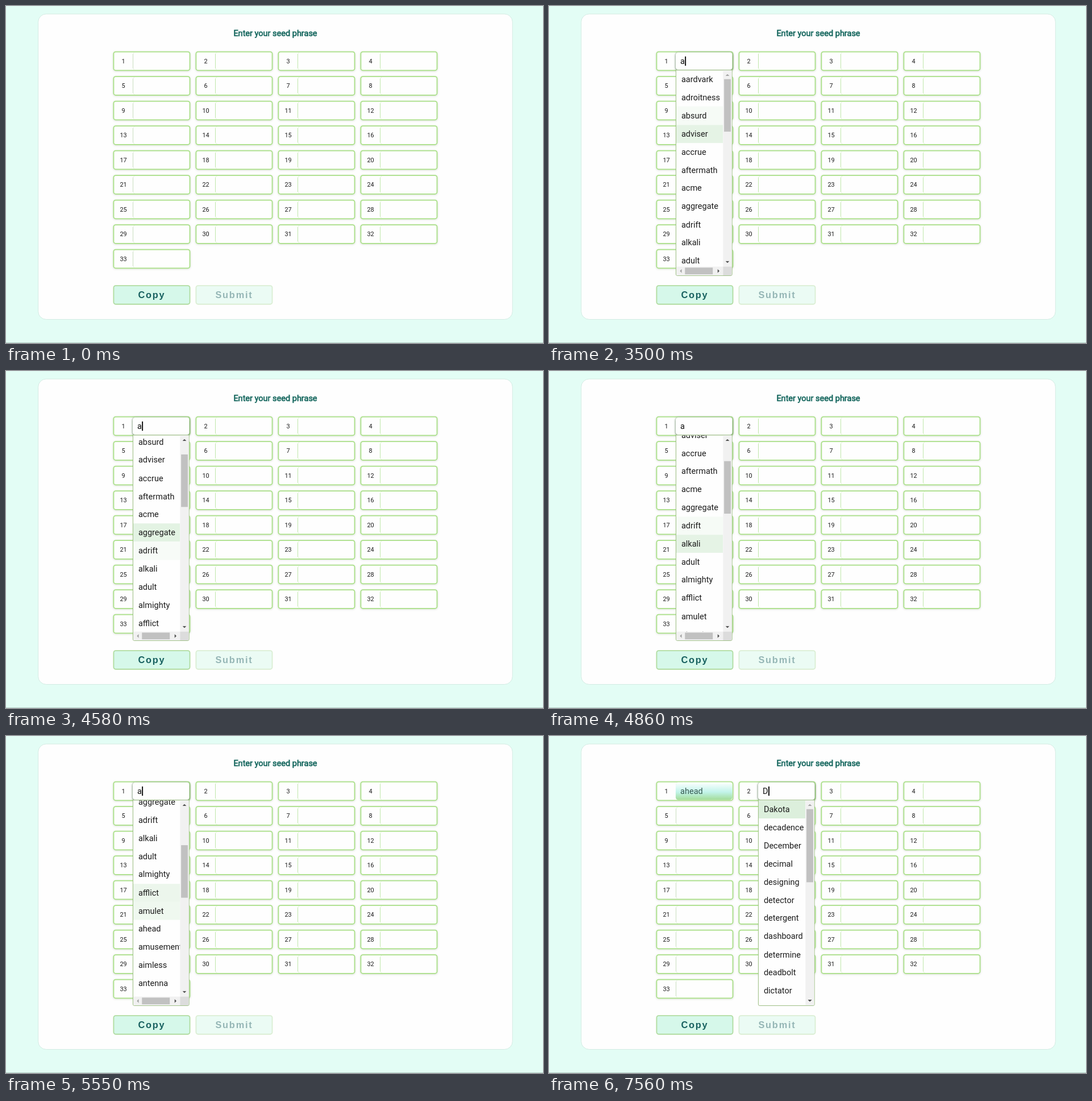
These frames come from a looping animation (945x593 px, 8000 ms). An HTML page:

```html
<!DOCTYPE html>
<html lang="en">
<head>
<meta charset="utf-8">
<title>Seed phrase form</title>
<style>
* { box-sizing: border-box; }
html, body { margin: 0; width: 100%; height: 100%; overflow: hidden; }
body { background: #e3fdf5; font: 16px Roboto, sans-serif; color: #1c1c1c; }
div { position: absolute; white-space: nowrap; }
.floor { left: 0; top: 592px; width: 945px; height: 1px; background: #b4d0c6; }
/* The page is laid out in whole pixels and shown slightly reduced. */
#stage { left: 0; top: 0; width: 1042px; height: 653px; transform: scale(.90625); transform-origin: 0 0; }
.card { left: 62px; top: 15px; width: 922px; height: 594px; border: 1px solid #d0e9e0; border-radius: 16px; background: #fefefe; }
.title { left: 373px; top: 43px; width: 300px; line-height: 22px; text-align: center; color: #14665d; -webkit-text-stroke: .7px #14665d; }
.box { width: 150px; height: 38px; border: 2px solid #aae088; border-radius: 5px; background: #fefefe; box-shadow: 0 1px 4px rgba(60, 90, 50, .2); }
.num { left: 0; top: 0; width: 36px; line-height: 34px; text-align: center; font-size: 12px; }
.sep { left: 36px; top: 0; width: 110px; height: 34px; border-left: 1px solid #b5e39b; border-radius: 5px; }
.glow, .fill { left: 36px; top: 0; width: 110px; height: 34px; border-radius: 5px; opacity: 0; }
.glow { background: #fefefe; box-shadow: 0 1px 4px rgba(25, 70, 20, .85); }
.fill { background: linear-gradient(#fdfffe, #c2f4ea 55%, #a3dc98); }
.text { left: 45px; top: 0; line-height: 34px; color: #111; }
.caret { top: 8px; width: 2px; height: 18px; background: #000; }
.button { top: 542px; width: 150px; height: 38px; border: 2px solid #b0dca0; border-radius: 5px; background: #d6f8ea; text-align: center;
  font: 700 18px/34px "Liberation Sans", Arial, sans-serif; letter-spacing: 2px; color: #17605f; }
.menu { top: 124px; width: 110px; height: 400px; border: 1px solid #90b773; border-radius: 0 0 3px 3px; background: #fefefe; overflow: hidden; }
.view { left: 0; top: 0; width: 91px; overflow: hidden; }
.list { left: 0; top: 0; width: 91px; }
.item { left: 0; width: 91px; height: 35.2px; padding-left: 10px; line-height: 36.6px; }
.track { background: #f1f1f1; }
.thumb { background: #c1c1c1; }
</style>
</head>
<body>
<div id="stage"></div>
<div class="floor"></div>
<script>
const LOOP = 8000, ROW = 35.2, POINTER_Y = 207, BAR = 17;
const stage = document.getElementById('stage');

function add(parent, cls, style = {}, text = '') {
  const el = document.createElement('div');
  el.className = cls;
  el.textContent = text;
  for (const key in style) {
    const value = style[key];
    el.style[key] = typeof value === 'number' && key !== 'opacity' ? value + 'px' : value;
  }
  parent.append(el);
  return el;
}

const show = (el, on) => { el.style.visibility = on ? 'inherit' : 'hidden'; };

const TRIANGLES = {
  up: '50% 0, 100% 100%, 0 100%', down: '0 0, 100% 0, 50% 100%',
  left: '0 50%, 100% 0, 100% 100%', right: '0 0, 100% 50%, 0 100%'
};
function addArrow(parent, dir, cx, cy, color) {
  const flat = dir === 'up' || dir === 'down';
  const width = flat ? 8 : 4, height = flat ? 4 : 8;
  return add(parent, '', {
    left: cx - width / 2, top: cy - height / 2, width, height,
    background: color, clipPath: `polygon(${TRIANGLES[dir]})`
  });
}

function addField(i) {
  const box = add(stage, 'box', { left: 208 + 160 * (i % 4), top: 88 + 48 * Math.floor(i / 4) });
  add(box, 'num', {}, String(i + 1));
  add(box, 'sep', i % 4 ? {} : { borderColor: '#bfd8b4' });
  if (i > 1) return null;
  return {
    glow: add(box, 'glow'),
    fill: add(box, 'fill'),
    text: add(box, 'text'),
    caret: add(box, 'caret')
  };
}

function addMenu(left, words, viewHeight, thumbHeight) {
  const el = add(stage, 'menu', { left });
  const view = add(el, 'view', { height: viewHeight });
  const list = add(view, 'list');
  const items = words.map((word, i) => add(list, 'item', { top: i * ROW }, word));
  add(el, 'track', { left: 91, top: 0, width: BAR, height: viewHeight });
  const thumb = add(el, 'thumb', { left: 93, top: BAR, width: 13, height: thumbHeight });
  const up = addArrow(el, 'up', 99.5, 9, '#a3a3a3');
  addArrow(el, 'down', 99.5, viewHeight - 9, '#505050');
  return { el, list, items, thumb, up };
}

add(stage, 'card');
add(stage, 'title', {}, 'Enter your seed phrase');
const [first, second] = Array.from({ length: 33 }, (_, i) => addField(i));
add(stage, 'button', { left: 208 }, 'Copy');
add(stage, 'button', { left: 368, opacity: 0.45 }, 'Submit');

const menuA = addMenu(246, ('aardvark adroitness absurd adviser accrue aftermath acme aggregate adrift alkali ' +
  'adult almighty afflict amulet ahead amusement aimless antenna Algol applicant').split(' '), 381, 102);
add(menuA.el, 'track', { left: 0, top: 381, width: 91, height: BAR });
add(menuA.el, 'thumb', { left: BAR, top: 383, width: 54, height: 13 });
add(menuA.el, '', { left: 91, top: 381, width: BAR, height: BAR, background: '#dcdcdc' });
addArrow(menuA.el, 'left', 9, 389.5, '#a3a3a3');
addArrow(menuA.el, 'right', 82, 389.5, '#505050');

const menuB = addMenu(406, ('Dakota decadence December decimal designing detector detergent ' +
  'dashboard determine deadbolt dictator').split(' '), 398, 142);
menuB.items[0].style.background = '#dcefdc';

const SCROLL = [[3960, 0], [4250, 22], [4580, 75], [5210, 185], [5700, 294], [5880, 320]];
function scrollAt(t) {
  const k = SCROLL.findIndex(([time]) => t < time);
  if (k === 0) return 0;
  if (k < 0) return SCROLL.at(-1)[1];
  const [t0, y0] = SCROLL[k - 1], [t1, y1] = SCROLL[k];
  return y0 + (y1 - y0) * (t - t0) / (t1 - t0);
}

// Moments at which the pointer enters the next row, before scrolling starts.
const ENTER = [2760, 3160, 3420, 3640, 3780];
const hoverAt = t => t < SCROLL[0][0]
  ? ENTER.filter(time => t >= time).length
  : Math.floor((POINTER_Y + scrollAt(t)) / ROW);

// Trailing average of the hovered row, equal to a linear fade of 150 ms.
function hoverWeights(t) {
  const weights = {};
  for (let k = 0; k < 15; k++) {
    const row = hoverAt(t + 20 - k * 10);
    weights[row] = (weights[row] || 0) + 1 / 15;
  }
  return weights;
}

const fadeIn = (t, start) => t < start ? 0 : Math.min(1, (t - start + 60) / 200);
const blink = (t, since) => t >= since && (t - since) % 1060 < 530;

const FOCUS_A = 735, TYPE_A = 2075, BLUR_A = 5785, PICK = 6415, TYPE_B = 7425;

function render(t) {
  const picked = t >= PICK, typedA = t >= TYPE_A, typedB = t >= TYPE_B;
  const pick = fadeIn(t, PICK);

  first.glow.style.opacity = fadeIn(t, FOCUS_A) * (1 - pick);
  first.fill.style.opacity = pick;
  first.text.textContent = picked ? 'ahead' : typedA ? 'a' : '';
  first.text.style.color = picked ? '#35594f' : '';
  first.caret.style.left = (typedA ? 53.5 : 45) + 'px';
  show(first.caret, t < BLUR_A && blink(t, typedA ? TYPE_A : FOCUS_A + 10));

  second.glow.style.opacity = pick;
  second.text.textContent = typedB ? 'D' : '';
  second.caret.style.left = (typedB ? 55.5 : 45) + 'px';
  show(second.caret, typedB || blink(t, PICK + 20));

  show(menuA.el, typedA && !picked);
  show(menuB.el, typedB);
  const scroll = scrollAt(t), weights = hoverWeights(t);
  menuA.list.style.top = -scroll + 'px';
  menuA.thumb.style.top = BAR + scroll * 0.267 + 'px';
  menuA.up.style.background = scroll > 0 ? '#505050' : '#a3a3a3';
  menuA.items.forEach((item, i) => {
    item.style.background = `rgba(221, 240, 221, ${weights[i] || 0})`;
  });
}

const start = performance.now();
function tick() {
  render((performance.now() - start) % LOOP);
  requestAnimationFrame(tick);
}
tick();
</script>
</body>
</html>
```
